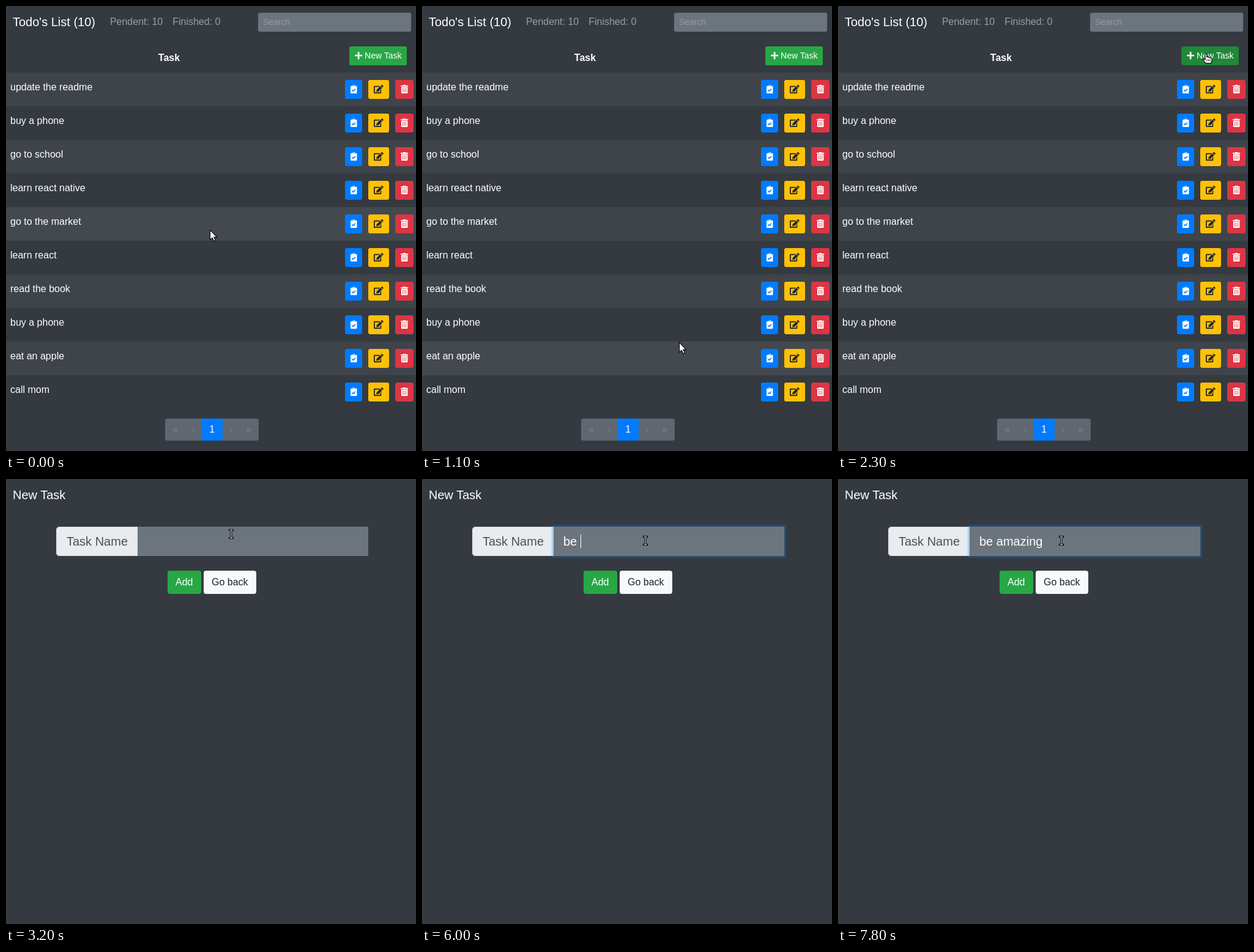
These frames come from a looping animation (670 px wide and 728 px high, 8000 ms). An HTML page:

```html
<!DOCTYPE html>
<html lang="en">
<head>
<meta charset="utf-8">
<title>Todo's List</title>
<style>
html, body { margin: 0; width: 100%; height: 100%; overflow: hidden; background: #343a40; }
body { position: relative; color: #fff; font-family: "Liberation Sans", Arial, sans-serif; }
div, svg, span { position: absolute; box-sizing: border-box; }
.page { inset: 0; }
span { white-space: pre; }
svg { overflow: visible; }
</style>
</head>
<body>
<div class="page" id="list"></div>
<div class="page" id="form"></div>
<script>
const LOOP = 8000, TICK = 100;
const ROW_TOP = 109, ROW_H = 55;
const GREEN = '#28a745', BLUE = '#007bff', YELLOW = '#ffc107', RED = '#dc3545', GRAY = '#6c757d';
const list = document.getElementById('list');
const form = document.getElementById('form');

function box(parent, x, y, w, h, fill, radius = 0) {
  const el = document.createElement('div');
  el.style.cssText = `left:${x}px;top:${y}px;width:${w}px;height:${h}px;background:${fill};border-radius:${radius}`
    + (typeof radius === 'number' ? 'px' : '');
  parent.append(el);
  return el;
}

// Places text by its baseline.
function text(parent, x, base, size, str, color = '#fff', extra = '') {
  const up = Math.round(size * 0.905), down = Math.round(size * 0.212);
  const el = document.createElement('span');
  el.style.cssText = `left:${x}px;top:${base - up}px;font-size:${size}px;line-height:${up + down}px;color:${color};${extra}`;
  el.textContent = str;
  parent.append(el);
  return el;
}

function svg(parent, x, y, w, h, view, inner) {
  parent.insertAdjacentHTML('beforeend',
    `<svg style="left:${x}px;top:${y}px" width="${w}" height="${h}" viewBox="${view}">${inner}</svg>`);
  return parent.lastElementChild;
}

const icons = {
  plus: [448, () => '<rect y="208" width="448" height="96" rx="32"/><rect x="176" y="32" width="96" height="448" rx="32"/>'],
  check: [384, bg => `<path d="M48 64H128a64 64 0 0 1 128 0h80q48 0 48 48v352q0 48-48 48H48q-48 0-48-48V112q0-48 48-48z"/>
    <circle cx="192" cy="64" r="24" fill="${bg}"/>
    <path d="M88 302L162 377 292 247" fill="none" stroke="${bg}" stroke-width="62"/>`],
  edit: [576, () => `<path d="M384 337V448H64V128H306L368 64H48q-48 0-48 48v352q0 48 48 48h352q48 0 48-48V276z"/>
    <path d="M396 76L500 180 274 406 160 416 170 302z"/>
    <path d="M418 54L460 12q28-24 56 0l49 49q22 27 0 55L522 158z"/>`],
  trash: [448, bg => `<path d="M32 128H416V464q0 48-48 48H80q-48 0-48-48z"/>
    <path d="M16 32H136L145 13q6-13 22-13h114q16 0 22 13l9 19h120q16 0 16 16v32q0 16-16 16H16q-16 0-16-16V48q0-16 16-16z"/>
    <path d="M128 208v224M224 208v224M320 208v224" stroke="${bg}" stroke-width="32" stroke-linecap="round"/>`]
};

function icon(parent, name, x, y, color, bg) {
  const [w, draw] = icons[name];
  svg(parent, x, y, w * 14 / 512, 14, `0 0 ${w} 512`, `<g fill="${color}">${draw(bg)}</g>`);
}

// List page
text(list, 11, 33, 20, "Todo's List (10)");
text(list, 169.9, 31, 16, 'Pendent: 10', 'rgba(255,255,255,.5)');
text(list, 272.2, 31, 16, 'Finished: 0', 'rgba(255,255,255,.5)');
box(list, 412, 11, 250, 31, GRAY, 3.2);
text(list, 420, 31, 14, 'Search', '#999');
text(list, 266.5, 90, 16, 'Task', '#fff', 'font-weight:bold;transform:translateX(-50%)');

const newBtn = box(list, 561, 66, 94, 31, GREEN, 3.2);
icon(list, 'plus', 570, 73.75, '#fff');
text(list, 586.1, 86, 14, 'New Task');

const tasks = ['update the readme', 'buy a phone', 'go to school', 'learn react native', 'go to the market',
  'learn react', 'read the book', 'buy a phone', 'eat an apple', 'call mom'];
const rows = tasks.map((task, i) => {
  const y = ROW_TOP + i * ROW_H;
  const row = box(list, 0, y, 670, ROW_H, 'none');
  text(row, 7, 29, 16, task);
  box(row, 554, 12, 28, 31, BLUE, 3.2);
  icon(row, 'check', 562.75, 19.75, '#fff', BLUE);
  box(row, 592, 12, 34, 31, YELLOW, 3.2);
  icon(row, 'edit', 601, 19.75, '#212529');
  box(row, 636, 12, 30, 31, RED, 3.2);
  icon(row, 'trash', 644.9, 19.75, '#fff', RED);
  return row;
});

box(list, 260, 675, 153, 36, '#606770', 4);
box(list, 320, 675, 34, 36, BLUE);
[...'«‹1›»'].forEach((ch, i) =>
  text(list, 276.5 + i * 30.1, 698, 16, ch, ch === '1' ? '#fff' : '#7d848b', 'transform:translateX(-50%)'));

// Form page
text(form, 11, 33, 20, 'New Task');
box(form, 82, 78, 134, 48, '#e9ecef', '4.8px 0 0 4.8px').style.border = '1px solid #ced4da';
text(form, 99, 109, 20, 'Task Name', '#495057');
const input = box(form, 215, 78, 377, 48, GRAY);
const typed = text(form, 231, 109, 20, '');
const squiggle = svg(form, 231, 110, 22, 4, '0 0 22 4',
  `<path d="M0 3${'l2 -2l2 2'.repeat(5)}l2 -2" fill="none" stroke="#d63a40" stroke-width="1"/>`);
const caret = box(form, 231, 91, 1, 22, '#fff');
box(form, 264, 150, 55, 38, GREEN, 4);
text(form, 277, 174, 16, 'Add');
box(form, 323, 150, 86, 38, '#f8f9fa', 4);
text(form, 336, 174, 16, 'Go back', '#212529');

// Pointers, each drawn around its hot spot
const pointer = inner => svg(document.body, 0, 0, 1, 1, '0 0 1 1', inner);
const arrow = pointer(`<path d="M.5 .5V16.6L4.2 13.2 6.8 18.8 9.4 17.6 6.8 12.1H11.8z"
  fill="#fff" stroke="#000" stroke-width="1.1"/>`);
const hand = pointer(`<path d="M0 1.5Q0 0 1.4 0T2.8 1.5V5.6Q5 4.6 5.8 6.2 7.8 5.6 8.6 7 11 6.6 11 9V11.5L9.6 15.5H1L-3 10.5Q-3.8 8.6-2 8.4L0 10z"
  fill="#fff" stroke="#000" stroke-width="1.2" stroke-linejoin="round"/>
  <path d="M3 9v3.5M5.5 9v3.5M8 9v3.5" stroke="#000" stroke-width=".9"/>`);
const beamPath = 'M-2.5 -6.5H2.5M0 -6.5V6.5M-2.5 6.5H2.5';
const beam = pointer(`<g fill="none"><path d="${beamPath}" stroke="#000" stroke-width="3" stroke-linecap="square"/>
  <path d="${beamPath}" stroke="#e4e6e8" stroke-width="1"/></g>`);

// time, x, y
const path = [
  [0, 333, 366], [100, 334, 340], [300, 338, 262], [400, 342, 240], [600, 362, 390], [800, 390, 590],
  [900, 402, 651], [1000, 412, 612], [1100, 420, 550], [1400, 470, 350], [1700, 525, 170], [1800, 545, 128],
  [2100, 585, 92], [2300, 600, 78], [3100, 600, 78], [3200, 368, 90], [3400, 365, 101]
];
// time, text
const typing = [[0, ''], [5600, 'b'], [5800, 'be'], [6000, 'be '], [6400, 'be am'], [6500, 'be ama'],
  [6700, 'be amaz'], [6900, 'be amazi'], [7100, 'be amazin'], [7300, 'be amazing']];
// time, caret shown
const blink = [[0, 0], [3600, 1], [4100, 0], [4600, 1], [5200, 0], [5600, 1], [7800, 0]];

const at = (steps, t) => steps.filter(s => s[0] <= t).pop()[1];
const show = (el, on) => { el.style.visibility = on ? 'visible' : 'hidden'; };

function place(t) {
  const i = path.findIndex(p => p[0] > t);
  if (i < 0) return path[path.length - 1].slice(1);
  const [t0, x0, y0] = path[i - 1], [t1, x1, y1] = path[i];
  const k = (t - t0) / (t1 - t0);
  return [x0 + (x1 - x0) * k, y0 + (y1 - y0) * k].map(Math.round);
}

function render(time) {
  const t = Math.floor(time % LOOP / TICK) * TICK;
  const onForm = t >= 3200;
  const [x, y] = place(t);
  const overBtn = !onForm && x >= 561 && x < 655 && y >= 66 && y < 97;
  list.style.display = onForm ? 'none' : '';
  form.style.display = onForm ? '' : 'none';

  const hover = Math.floor((y - ROW_TOP) / ROW_H);
  rows.forEach((row, i) => {
    row.style.background = i === hover ? '#43494e' : i % 2 ? 'none' : '#3e444a';
  });
  newBtn.style.background = overBtn ? '#218838' : GREEN;
  newBtn.style.border = overBtn ? '1px solid #1e7e34' : 'none';

  for (const el of [arrow, hand, beam]) {
    el.style.transform = `translate(${x}px,${y}px)`;
    show(el, el === (onForm ? beam : overBtn ? hand : arrow));
  }

  const focus = t < 3600 ? 0 : t < 3700 ? 0.5 : 1;
  input.style.boxShadow = focus ? `0 0 0 ${3.2 * focus}px rgba(0,123,255,${0.25 * focus})` : 'none';
  const str = at(typing, t);
  if (typed.textContent !== str) typed.textContent = str;
  caret.style.left = Math.round(231 + typed.getBoundingClientRect().width) + 'px';
  caret.style.display = at(blink, t) ? '' : 'none';
  squiggle.style.display = t >= 6000 ? '' : 'none';
}

const start = performance.now();
function loop() {
  render(performance.now() - start);
  requestAnimationFrame(loop);
}
loop();
</script>
</body>
</html>
```
